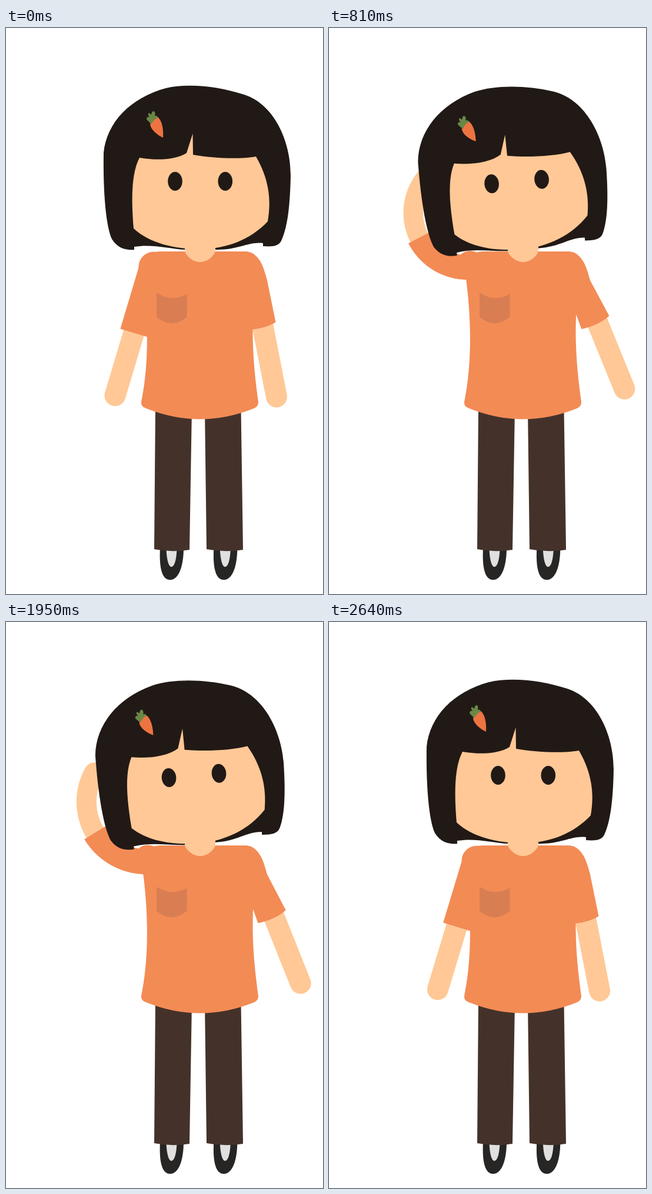
An HTML page with a canvas for the animation above (2.7 s loop, 539 px wide and 960 px high).

```html
<!DOCTYPE html>
<html lang="en">
<head>
<meta charset="utf-8">
<title>Girl scratching her head</title>
<style>
  html, body { margin: 0; width: 100%; height: 100%; overflow: hidden; background: #fff; }
  canvas { display: block; width: 539px; height: 960px; }
</style>
</head>
<body>
<canvas id="stage" width="539" height="960"></canvas>
<script>
const ctx = document.getElementById('stage').getContext('2d');
const LOOP = 2700, STEP = 30;
const RAD = Math.PI / 180;
const COLOR = {
  skin: '#ffc896', shirt: '#f38b55', pocket: '#d87e52', hair: '#211915',
  pants: '#44322a', shoe: '#272624', tongue: '#e0e0e0', carrot: '#ed7442', leaf: '#6a8746'
};

const SHAPES = {
  hair: `M218 376 C204 377 190 374 180 358 C170 336 165 280 166 212 C171 160 212 118 272 102
    C310 93 362 99 405 113 C455 129 484 190 484 250 C483 310 477 342 468 361 C463 371 451 371 437 370
    V365 C412 362 395 377 356 376 H305 C275 374 248 366 218 371 Z`,
  face: `M227 220 C256 225 288 224 307 212 L317.5 179 L318 215 C352 221 398 223 425 218
    C446 254 452 290 445 328 C416 359 374 375 330 375 C286 375 244 365 217 340 C213 290 213 247 227 220 Z`,
  carrot: 'M245 163 C246 173 258 182 267 186 C268 170 265 157 258 151 C252 153 248 157 245 163 Z',
  leaf: `M247 163 L239 155 Q239 150 244 151 Q240 146 243 144 L247 147 Q248 141 251 141
    Q255 143 253 149 L257 149 L258 152 Q251 155 247 163 Z`,
  neck: 'M304 362 V379 C308 389 319 397 330 397 C341 397 352 389 356 379 V362 Z',
  torso: `M262 379 H405 C420 379 426 385 429 399 L420 490 C418 545 423 590 429 634
    Q429 642 422 645 Q330 682 238 645 Q229 642 230 634 C241 582 244 510 233 425 L240 388 Q248 379 262 379 Z`,
  pocket: 'M256 449 Q282 466 307.5 451 V490 Q282 512 256 490 Z',
  leftLeg: 'M254 645 L252 884 Q282 890 312 885 L316 645 Z',
  rightLeg: 'M338 645 L341 884 Q372 890 403 885 L399.5 645 Z',
  shoe: 'M262 882 C260 918 266 936 279 936 C294 936 302 912 302 882 Z',
  tongue: 'M272.5 882 C273 903 277 914 281 914 C286 914 290 903 290.5 882 Z'
};
const paths = {};
for (const name in SHAPES) paths[name] = new Path2D(SHAPES[name]);

function paint(name, color) {
  ctx.fillStyle = color;
  ctx.fill(paths[name]);
}

function disc(x, y, rx, ry, color) {
  ctx.fillStyle = color;
  ctx.beginPath();
  ctx.ellipse(x, y, rx, ry, 0, 0, Math.PI * 2);
  ctx.fill();
}

function rotator(cx, cy, degrees) {
  const c = Math.cos(degrees * RAD), s = Math.sin(degrees * RAD);
  return (x, y) => [cx + (x - cx) * c - (y - cy) * s, cy + (x - cx) * s + (y - cy) * c];
}

function strokeLine(points, width, cap, color) {
  ctx.lineWidth = width;
  ctx.lineCap = cap;
  ctx.lineJoin = 'round';
  ctx.strokeStyle = color;
  ctx.beginPath();
  points.forEach(([x, y]) => ctx.lineTo(x, y));
  ctx.stroke();
}

function ease(t, from, to) {
  const k = Math.min(1, Math.max(0, (t - from) / (to - from)));
  return (1 - Math.cos(Math.PI * k)) / 2;
}

const raiseAt = t => ease(t, 10, 840) - ease(t, 1840, 2660);

// 0 at the top of a scratch, 1 at the bottom
const scratchAt = t => t < 840 || t > 1840 ? 0 : (1 - Math.cos((t - 840) / 250 * Math.PI)) / 2;

// The eyes shrink for a moment while the arm goes up.
const eyeScaleAt = t => 1 - 0.26 * (ease(t, 300, 450) - ease(t, 450, 600));

// The arm swings straight, then curls evenly along its length.
function drawLeftArm(raise, scratch) {
  const cuff = 117;
  const q = Math.max(0, raise - 0.56), curl = q / 0.44;
  const shoulder = [251, 405 + 6 * Math.sin(Math.PI * raise)];
  const start = (q ? -13.4 + 79.4 * q - 160 * q * q : -73.3 + 107 * raise) - 7 * scratch;
  const bend = 276 * q + 111 * q * q + 17 * scratch;
  const length = 228 - 16 * Math.sin(Math.PI * curl) + 2 * curl;
  const half = 24 - 3.3 * curl * curl;

  const trace = (from, to) => {
    const points = [];
    let [x, y] = shoulder;
    for (let s = 0; s <= to; s++) {
      if (s >= from) points.push([x, y]);
      const heading = (start + bend * (s + 0.5) / length) * RAD;
      x -= Math.cos(heading);
      y -= Math.sin(heading);
    }
    return points;
  };

  strokeLine(trace(cuff - 20, length), 36 - 2.5 * curl * curl, 'round', COLOR.skin);
  strokeLine(trace(0, cuff), half * 2, 'butt', COLOR.shirt);
  const cap = 25.5 - 1.5 * curl;
  disc(251 - 11 * curl, 405 - 3 * curl, cap, cap, COLOR.shirt);
}

// The shoulder stays put while the cuff and forearm swing.
function drawRightArm(raise) {
  const turn = rotator(412, 402, -11.2 * raise);
  strokeLine([turn(431, 477), turn(460, 625.5)], 36, 'round', COLOR.skin);
  ctx.fillStyle = COLOR.shirt;
  ctx.beginPath();
  ctx.moveTo(405, 379);
  ctx.bezierCurveTo(430, 380, 437, 402, 444, 428);
  ctx.lineTo(...turn(458.5, 499));
  ctx.quadraticCurveTo(...turn(439, 511), ...turn(408, 512));
  ctx.lineTo(396, 420);
  ctx.fill();
}

function drawLegs() {
  for (const shift of [0, 91.3]) {
    ctx.save();
    ctx.translate(shift, 0);
    paint('shoe', COLOR.shoe);
    paint('tongue', COLOR.tongue);
    ctx.restore();
  }
  paint('leftLeg', COLOR.pants);
  paint('rightLeg', COLOR.pants);
}

function drawHead(raise, eyeScale) {
  ctx.save();
  ctx.translate(330, 385);
  ctx.rotate(-5.1 * raise * RAD);
  ctx.translate(-330, -385);
  paint('hair', COLOR.hair);
  paint('face', COLOR.skin);
  for (const x of [287.5, 372.8]) disc(x, 260, 12.3 * eyeScale, 16 * eyeScale, COLOR.hair);
  paint('carrot', COLOR.carrot);
  paint('leaf', COLOR.leaf);
  ctx.restore();
}

function draw(t) {
  const raise = raiseAt(t);
  ctx.fillStyle = '#fff';
  ctx.fillRect(0, 0, 539, 960);
  drawLegs();
  drawLeftArm(raise, scratchAt(t));
  drawRightArm(raise);
  paint('torso', COLOR.shirt);
  paint('pocket', COLOR.pocket);
  drawHead(raise, eyeScaleAt(t));
  paint('neck', COLOR.skin);
}

const startTime = performance.now();
function tick() {
  const t = (performance.now() - startTime) % LOOP;
  draw(Math.floor(t / STEP) * STEP);
  requestAnimationFrame(tick);
}
tick();
</script>
</body>
</html>
```
